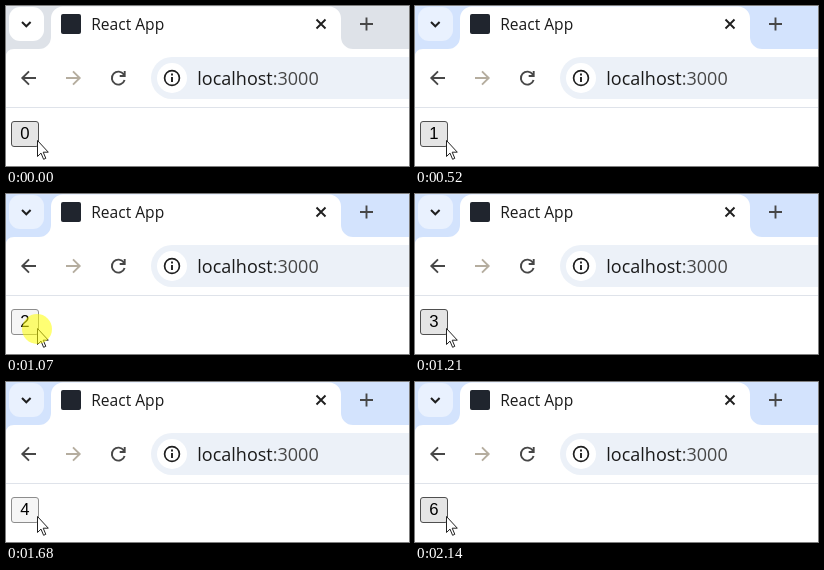
Write an HTML page that moves like this. It is 403 px wide and 160 px high and loops after 2740 ms.

```html
<!DOCTYPE html>
<html lang="en">
<head>
<meta charset="utf-8">
<title>Counter</title>
<style>
  html, body { margin: 0; width: 100%; height: 100%; overflow: hidden; background: #fff; }
  svg { display: block; }
  text { font-family: "Open Sans", "Noto Sans", sans-serif; fill: #1a1a1a; }
  .icon { fill: none; stroke: #474747; stroke-width: 1.9; }
  #count { font: 16.7px "Liberation Sans", Arial, sans-serif; fill: #000; text-anchor: middle; }
</style>
</head>
<body>
<svg width="403" height="160" viewBox="0 0 403 160">
  <!-- tab strip -->
  <rect id="strip" width="403" height="60"/>
  <rect id="menu" x="3" y="1" width="35" height="34" rx="11"/>
  <path d="M0 160V51Q0 43 8 43H33A12 12 0 0 0 45 31V12.5A12 12 0 0 1 57 .5H323A12 12 0 0 1 335 12.5V31A12 12 0 0 0 347 43H403V160Z" fill="#fff"/>
  <path class="icon" d="M16 16l4.3 4.3 4.3-4.3" style="stroke:#1f1f1f;stroke-width:2"/>
  <rect x="55" y="8" width="20" height="20" rx="2" fill="#20252e"/>
  <text x="85.2" y="24" font-size="15.6">React App</text>
  <path class="icon" d="M310.5 13.5l9 9m0-9l-9 9" style="stroke:#1f1f1f"/>
  <path class="icon" d="M354 18h13M360.5 11.5v13"/>

  <!-- toolbar -->
  <path class="icon" d="M30 72H17M23 65.3L16.3 72l6.7 6.7"/>
  <path class="icon" d="M60 72H73M67 65.3l6.7 6.7-6.7 6.7" style="stroke:#b5ad9f"/>
  <path class="icon" d="M117.8 68.5A6.5 6.5 0 1 0 118.6 74M118.7 65v5h-5"/>
  <path d="M403 51H166a21 21 0 0 0 0 42H403Z" fill="#ecf1f8"/>
  <circle cx="166" cy="72" r="15" fill="#fff"/>
  <circle class="icon" cx="166" cy="72" r="7.4" style="stroke:#1f1f1f;stroke-width:1.7"/>
  <path class="icon" d="M166 71v5M166 67.5v2" style="stroke:#1f1f1f"/>
  <text x="191.3" y="79" font-size="18">localhost<tspan fill="#474747">:3000</tspan></text>
  <path d="M0 101.5H403" stroke="#dfe3ea"/>

  <!-- page -->
  <rect id="button" x="5.5" y="115.5" width="27" height="25" rx="2.5"/>
  <text id="count" x="19" y="132.7">0</text>
  <path d="M31.5 134.5V150.5l3.5-3.4 2.6 6.2 2.2-1-2.6-6.1h5.1Z" fill="#fff" stroke="#222"/>
  <circle id="click" cx="31" cy="135" r="15" fill="#ff0" fill-opacity=".55"/>
</svg>
<script>
  const LOOP = 2740;
  const FOCUS = 390; // the window becomes active on the first click
  const HOVER = 0, DOWN = 1, CLICK = 2;
  // start time, count, button state
  const steps = [
    [0, 0, HOVER], [FOCUS, 0, CLICK],
    [520, 1, HOVER], [740, 1, DOWN], [810, 1, CLICK],
    [870, 2, HOVER], [1000, 2, DOWN], [1070, 2, CLICK],
    [1210, 3, HOVER], [1340, 3, DOWN], [1410, 3, CLICK],
    [1480, 4, HOVER], [1680, 4, DOWN], [1750, 4, CLICK],
    [1810, 5, HOVER], [2010, 5, CLICK],
    [2140, 6, HOVER]
  ];
  const [strip, menu, button, count, click] =
    ["strip", "menu", "button", "count", "click"].map(id => document.getElementById(id));

  function draw() {
    const time = performance.now() % LOOP;
    const [, value, state] = steps.findLast(([start]) => start <= time);
    const focused = time >= FOCUS;
    strip.setAttribute("fill", focused ? "#d3e3fd" : "#dee2e8");
    menu.setAttribute("fill", focused ? "#e9f1fe" : "#fff");
    count.textContent = value;
    button.setAttribute("fill", state === HOVER ? "#e5e5e5" : "#f5f5f5");
    button.setAttribute("stroke", state === HOVER ? "#4f4f4f" : "#8d8d8d");
    click.setAttribute("visibility", state === CLICK ? "visible" : "hidden");
    requestAnimationFrame(draw);
  }
  draw();
</script>
</body>
</html>
```
